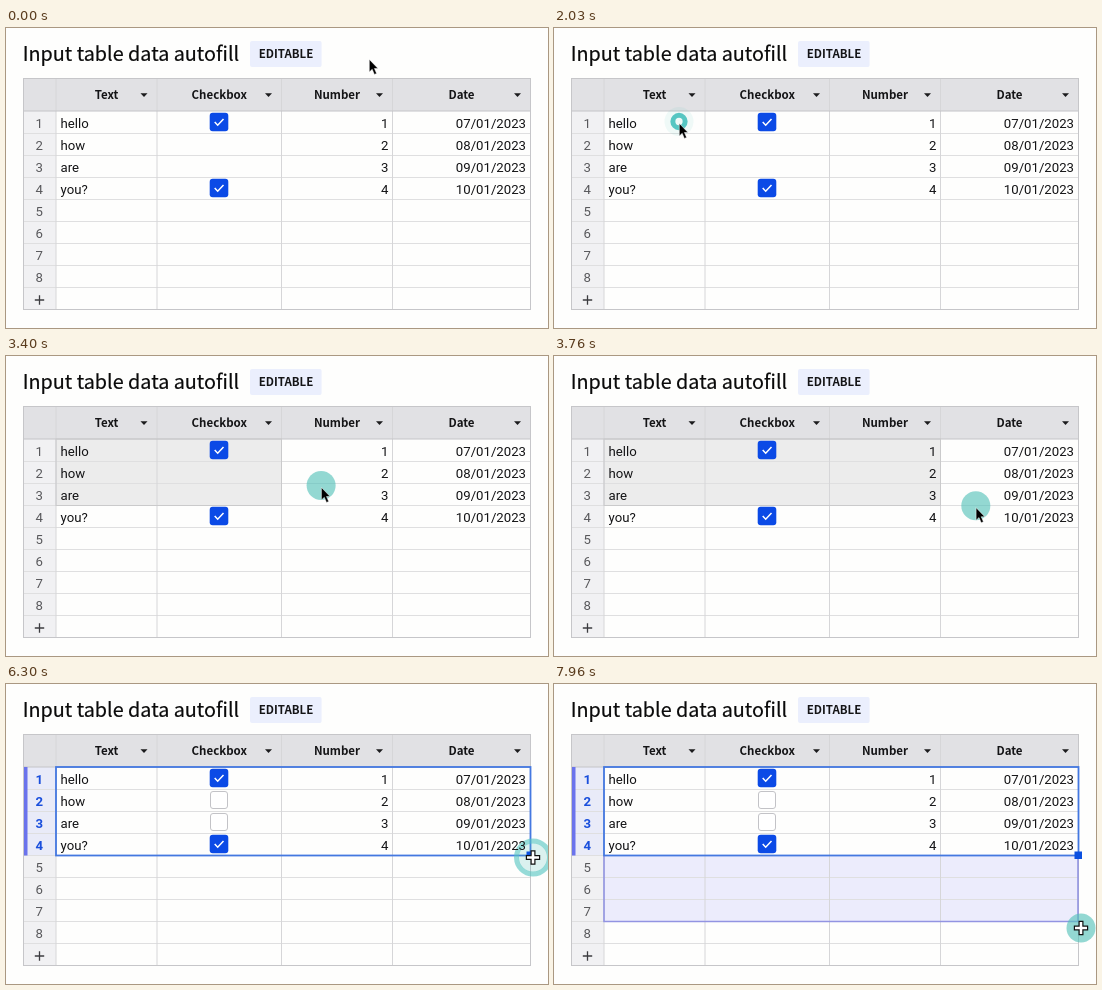
An HTML page for the animation above (8000 ms loop, 542 by 300 pixels).

```html
<!DOCTYPE html>
<html lang="en">
<head>
<meta charset="utf-8">
<title>Input table data autofill</title>
<style>
html, body { margin: 0; width: 100%; height: 100%; overflow: hidden; background: #fefefd; }
svg { display: block; width: 542px; height: 300px; }
text { font: 13.2px Roboto, Arial, sans-serif; fill: #141416; }
.title, .head { font-family: "Noto Sans CJK JP", "Noto Sans CJK SC", "Noto Sans CJK", sans-serif; }
.title { font-size: 19.8px; fill: #0a0a0a; stroke: #0a0a0a; stroke-width: .2px; }
.head { font-size: 11.5px; font-weight: bold; }
.mid { text-anchor: middle; }
.end { text-anchor: end; }
.num { fill: #58585b; }
.num.on { fill: #1a4fdc; font-weight: 700; }
</style>
</head>
<body>
<svg id="stage" viewBox="0 0 542 300"></svg>
<script>
const NS = 'http://www.w3.org/2000/svg';
const stage = document.getElementById('stage');
const LOOP = 8000;
const COLS = [17.5, 50, 151, 275.5, 386.5, 524.5];
const [OUTER, LEFT, , , , RIGHT] = COLS;
const TOP = 83, BOTTOM = 281.5, STEP = 22;
const rowEnd = n => n ? 83.5 + STEP * n : TOP;
const SEL = rowEnd(4);

const set = (el, attrs) => { for (const k in attrs) el.setAttribute(k, attrs[k]); };
const show = (el, on) => { el.style.display = on ? '' : 'none'; };
function add(tag, attrs = {}, parent = stage) {
  const el = document.createElementNS(NS, tag);
  set(el, attrs);
  return parent.appendChild(el);
}
const rect = (x, y, width, height, fill, more = {}, parent = stage) =>
  add('rect', { x, y, width, height, fill, ...more }, parent);
const line = (x1, y1, x2, y2, stroke) =>
  add('path', { d: `M${x1} ${y1}L${x2} ${y2}`, stroke });
function label(str, x, y, cls = '') {
  add('text', { x, y, class: cls }).textContent = str;
  return stage.lastChild;
}
const baseline = row => 100.3 + row * STEP;

// title and badge
label('Input table data autofill', 16.7, 33, 'title');
rect(244, 13, 71.6, 26, '#ebeffd', { rx: 2 });
label('EDITABLE', 280, 30, 'head mid');

// table background
rect(OUTER, 50.5, RIGHT - OUTER, 32.5, '#e1e1e4');
rect(OUTER, TOP, LEFT - OUTER, BOTTOM - TOP, '#f1f1f3');
const rowTint = rect(OUTER, TOP, LEFT - OUTER, SEL - TOP, '#e9ebf8');
const fill = rect(LEFT, SEL, RIGHT - LEFT, 0, '#ececfc');
const shade = rect(LEFT, TOP, 0, 0, '#ececec');

// grid
for (let n = 1; n < 9; n++) line(OUTER, rowEnd(n), RIGHT, rowEnd(n), '#dfdfe0');
COLS.slice(1, -1).forEach(x => line(x, 50.5, x, BOTTOM, '#d6d6d8'));
line(OUTER, TOP, RIGHT, TOP, '#c4c4c7');
rect(OUTER, 50.5, RIGHT - OUTER, BOTTOM - 50.5, 'none', { stroke: '#c6c6c9' });
const shadeEdge = rect(LEFT, TOP, 0, 0, 'none', { stroke: '#cacacb' });

// headers
['Text', 'Checkbox', 'Number', 'Date'].forEach((name, i) => {
  const mid = (COLS[i + 1] + COLS[i + 2]) / 2;
  const tip = COLS[i + 2] - 13;
  label(name, mid, 71, 'head mid');
  add('path', { d: `M${tip - 3.5} 65.2h7l-3.5 3.8z`, fill: '#1b1b1d' });
});

// selection outline
const fillEdge = add('path', { fill: 'none', stroke: '#9294e2', 'stroke-width': 1.6 });
const frame = add('g');
rect(18, TOP, 3.5, SEL - TOP, '#6a73ec', {}, frame);
rect(LEFT, TOP, RIGHT - LEFT, SEL - TOP, 'none', { stroke: '#4478e0', 'stroke-width': 1.8 }, frame);

// pointer highlight
const disc = add('circle', { r: 14.5, fill: '#54c1ba' });
const ring = add('circle', { fill: 'none', stroke: '#54c5c1' });

// cells
const nums = [];
for (let r = 0; r < 8; r++) nums.push(label(r + 1, 33.3, baseline(r), 'num mid'));
add('path', { d: 'M28.8 272h9.4M33.5 267.3v9.4', stroke: '#3c3c40', 'stroke-width': 1.3 });
const empty = add('g');
['hello', 'how', 'are', 'you?'].forEach((word, r) => {
  const y = baseline(r), mid = 94 + r * STEP;
  label(word, 54.5, y);
  label(r + 1, 382.5, y, 'end');
  label(String(r + 7).padStart(2, '0') + '/01/2023', 520, y, 'end');
  if (r % 3 === 0) {
    rect(203.7, mid - 9.3, 18.6, 18.6, '#0b4ae6', { rx: 3 });
    add('path', { d: `M208.7 ${mid}l3 3.2 5.8-6.2`, fill: 'none', stroke: '#fff', 'stroke-width': 1.5 });
  } else {
    rect(204.5, mid - 8.5, 17, 17, '#fff', { rx: 2.5, stroke: '#c3c3c7' }, empty);
  }
});
const handle = rect(520.5, 167.5, 7.5, 7.5, '#0b50e0');

// pointers
const arrow = add('path', {
  d: 'M.3 .4V13L3.2 10.3 5.4 15.4 7.6 14.4 5.4 9.5H9Z',
  stroke: '#fff', 'stroke-width': .6, 'stroke-opacity': .8
});
const cross = add('path', {
  d: 'M-1.9-6.6H1.9V-1.9H6.6V1.9H1.9V6.6H-1.9V1.9H-6.6V-1.9H-1.9Z',
  fill: '#fff', stroke: '#111', 'stroke-width': 1.2
});

const clamp = v => Math.max(0, Math.min(1, v));
const span = (t, a, b) => clamp((t - a) / (b - a));
const ease = u => .65 * u + .35 * u * u * (3 - 2 * u);

const HOME = [363, 31];
const MOVES = [
  { from: 730, to: 1600, end: [125, 95] },
  { from: 2690, to: 4060, end: [489, 164] },
  { from: 5240, to: 5600, end: [527, 173.5] },
  { from: 7010, to: 7960, end: [527, 244] }
];
function place(t) {
  let [x, y] = HOME;
  for (const { from, to, end } of MOVES) {
    const u = ease(span(t, from, to));
    x += (end[0] - x) * u;
    y += (end[1] - y) * u;
  }
  return [x, y];
}

// a press closes a ring in on the pointer, then fills a disc
function highlight(t, cx, cy) {
  const first = t < 5000;
  const start = first ? 1600 : 6060;
  const u = span(t, start, start + 570);
  const outer = 28 * (1 - u ** 1.32);
  const width = Math.min(5, outer);
  set(ring, { cx, cy, r: outer - width / 2, 'stroke-width': width, opacity: clamp(.12 + 1.15 * u) });
  show(ring, u > 0 && u < 1);
  const glow = .35 * (1 - u) * span(u, 0, .2) + .63 * span(u, .78, 1);
  const release = first ? span(t, 4200, 4600) : 0;
  set(disc, { cx, cy, opacity: glow * (1 - release) });
}

// cells join the range once the pointer is well inside them
function dragShade(t, x, y) {
  const on = t >= 2700 && t < 4230;
  let c = 1, r = 1;
  while (c < 4 && x > COLS[c + 1] + 40) c++;
  while (r < 4 && y > rowEnd(r) + 2) r++;
  for (const el of [shade, shadeEdge]) {
    show(el, on);
    set(el, { width: COLS[c + 1] - LEFT, height: rowEnd(r) - TOP });
  }
}

function draw(t) {
  const [x, y] = place(t);
  const plus = t >= 5600;
  const selected = t >= 4230;
  show(arrow, !plus);
  show(cross, plus);
  set(plus ? cross : arrow, { transform: `translate(${x} ${y})` });
  highlight(t, x, plus ? y : y - 1.5);
  dragShade(t, x, y);

  [rowTint, frame, empty, handle].forEach(el => show(el, selected));
  nums.forEach((n, i) => n.classList.toggle('on', selected && i < 4));

  const extra = plus ? Math.min(3, Math.round((y - SEL) / STEP)) : 0;
  const bottom = rowEnd(4 + extra);
  [fill, fillEdge].forEach(el => show(el, extra > 0));
  set(fill, { height: bottom - SEL });
  set(fillEdge, { d: `M${LEFT} ${SEL}V${bottom}H${RIGHT - .5}V${SEL}` });
}

const begin = performance.now();
function tick() {
  draw((performance.now() - begin) % LOOP);
  requestAnimationFrame(tick);
}
tick();
</script>
</body>
</html>
```
